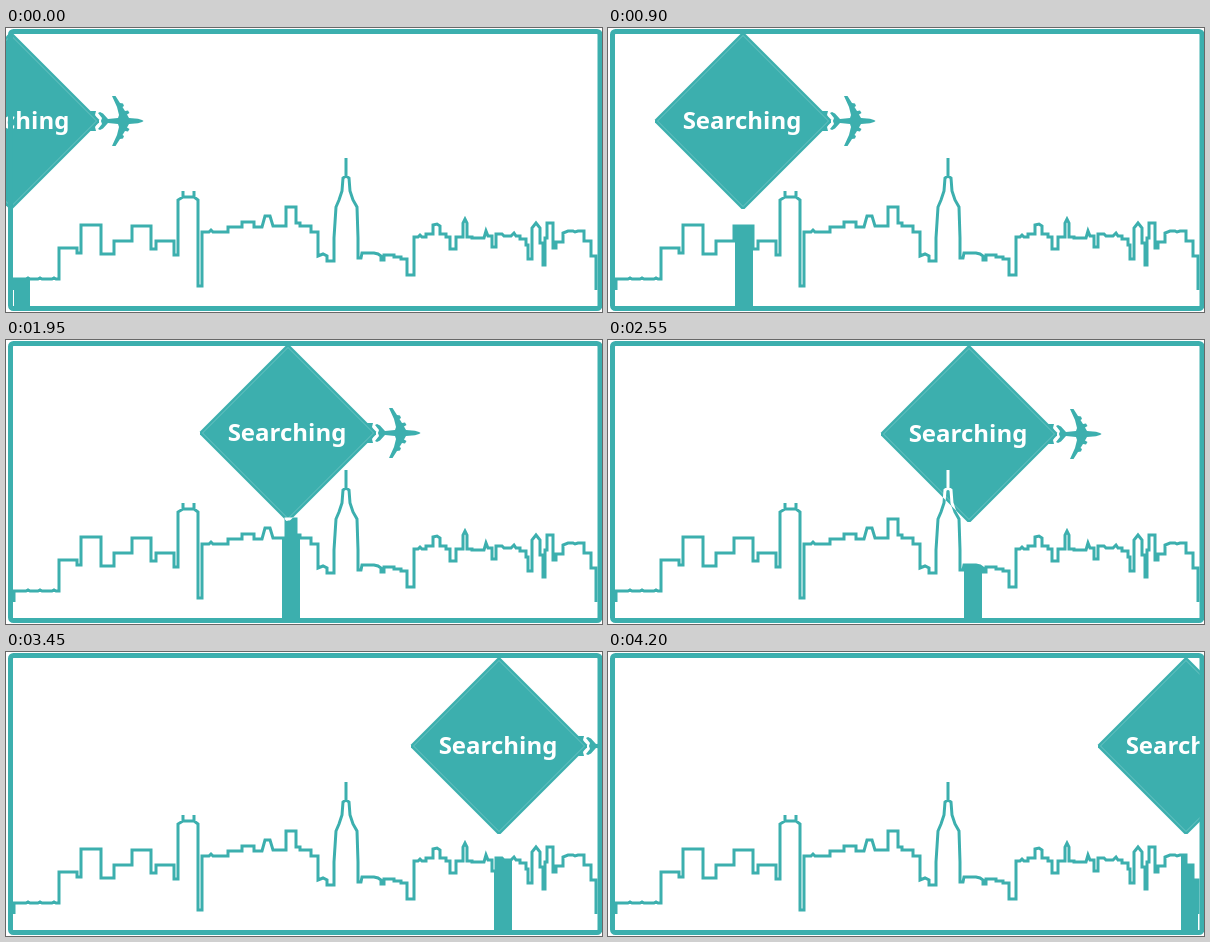
An HTML page with a canvas that plays this animation: 596x284 px, repeating every 4350 ms.

```html
<!DOCTYPE html>
<html lang="en">
<head>
<meta charset="utf-8">
<style>
html, body { margin: 0; width: 100%; height: 100%; overflow: hidden; background: #fff; }
canvas { display: block; }
</style>
</head>
<body>
<canvas id="stage" width="596" height="284"></canvas>
<script>
const ctx = document.getElementById('stage').getContext('2d');
const TEAL = '#3cafae';
const STEP_MS = 150, STEPS = 29;

// [step, sign centre x, post centre x]
const keys = [[0, 5, 15], [6, 135, 135.5], [7, 158, 159], [10, 226, 229.5], [14, 300, 303.5],
  [17, 361, 364.5], [21, 456, 459.5], [23, 493, 496.5], [28, 578, 581.5]];

const skylineData = `M8 262V251H20l2 -1 2 1H32l2 -1 2 1H46l2 -1 2 1H53V220H71V225H75V197H95V226H108V213H126V198H145V221H150
  V213H168V227H172V172L177 169V163V169H188V163V169L192 172V258H196V204H203l2 -2 2 2H222V199H236V194H248V199H256
  L259 188H264L267 198H280V179H290V195H294V198H305V204H312V228L317 226 321 228V233H328V210L330 179 333 172
  336 163 337 150 340 148V130V148L343 150 344 163 347 172 351 179 352 210V230H355L356 225H368L372 226 375 228
  V232H378V227H388V229H395V231H401V247H408V209H412l2 -2 2 2H420V206H427V197L431 196 434 198V206H440V209H444V221H450
  V209H457V195L459 191 461 195V209H466V210H478L480 203 482 208H486V219H490V206H496L498 208H505L508 205 510 208
  H514V211H520V217H522V231H526V200L530 195 534 200V215H537V237H539V210H541V195H547V220H550V214H557V205L562 203
  H567L569 204 572 203H578V213H585V228H590V262`;
const skyline = new Path2D(skylineData);
const city = new Path2D(skylineData + 'V279H8Z');
const diamond = new Path2D('M-1.5 -88H1.5L88 -1.5V1.5L1.5 88H-1.5L-88 1.5V-1.5Z');
const rim = new Path2D('M0 -85.5L85.5 0 0 85.5 -85.5 0Z');
const hitch = new Path2D('M77 -10H85L84 -6 87 0 84 6 85 10H77Z');

// Upper half of the plane, mirrored for the lower half
const halfPlane = new Path2D(`M90 0L91 -3 87 -8 89 -9 92 -7.5 97 -2 107 -3 108 -6 106 -14 101 -25H104.5L109 -18
  112 -17.5 113 -15 111.5 -14 114 -10 117 -10.5 118.5 -8 116 -6.5 118 -3 127 -2.3 131 -1 132.5 0.2H90Z`);

function positionAt(step) {
  const i = keys.findIndex((key, n) => n > 0 && step <= key[0]);
  const [s0, ...from] = keys[i - 1], [s1, ...to] = keys[i];
  return from.map((v, n) => v + (to[n] - v) * (step - s0) / (s1 - s0));
}

function drawSign(x, y) {
  ctx.save();
  ctx.translate(x, y);
  ctx.fillStyle = TEAL;
  ctx.fill(diamond);
  ctx.fill(hitch);
  ctx.lineWidth = 0.7;
  ctx.strokeStyle = 'rgba(255,255,255,.35)';
  ctx.stroke(rim);
  ctx.fill(halfPlane);
  ctx.scale(1, -1);
  ctx.fill(halfPlane);
  ctx.scale(1, -1);
  ctx.fillStyle = '#fff';
  ctx.font = '600 24px "Noto Sans", sans-serif';
  ctx.textAlign = 'center';
  ctx.fillText('Searching', -1, 8);

  // The skyline turns white where the sign covers it
  ctx.clip(diamond);
  ctx.translate(-x, -y);
  drawSkyline('#fff');
  ctx.restore();
}

function drawSkyline(color) {
  ctx.strokeStyle = color;
  ctx.lineWidth = 3;
  ctx.stroke(skyline);
}

function drawPost(x) {
  ctx.save();
  ctx.clip(city);
  ctx.fillStyle = TEAL;
  ctx.fillRect(x - 9, 170, 18, 110);
  ctx.restore();
}

function drawBorder() {
  ctx.strokeStyle = TEAL;
  ctx.lineWidth = 5;
  ctx.beginPath();
  ctx.roundRect(4.5, 3.5, 589.5, 277, 3);
  ctx.stroke();
}

function render(now) {
  const step = Math.floor(now / STEP_MS) % STEPS;
  const [signX, postX] = positionAt(step);
  ctx.fillStyle = '#fff';
  ctx.fillRect(0, 0, 596, 284);
  drawPost(Math.round(postX));
  drawSkyline(TEAL);
  drawSign(Math.round(signX), step > 14 ? 94 : 93);
  drawBorder();
}

const start = performance.now();
function tick() {
  render(performance.now() - start);
  requestAnimationFrame(tick);
}
tick();
</script>
</body>
</html>
```
